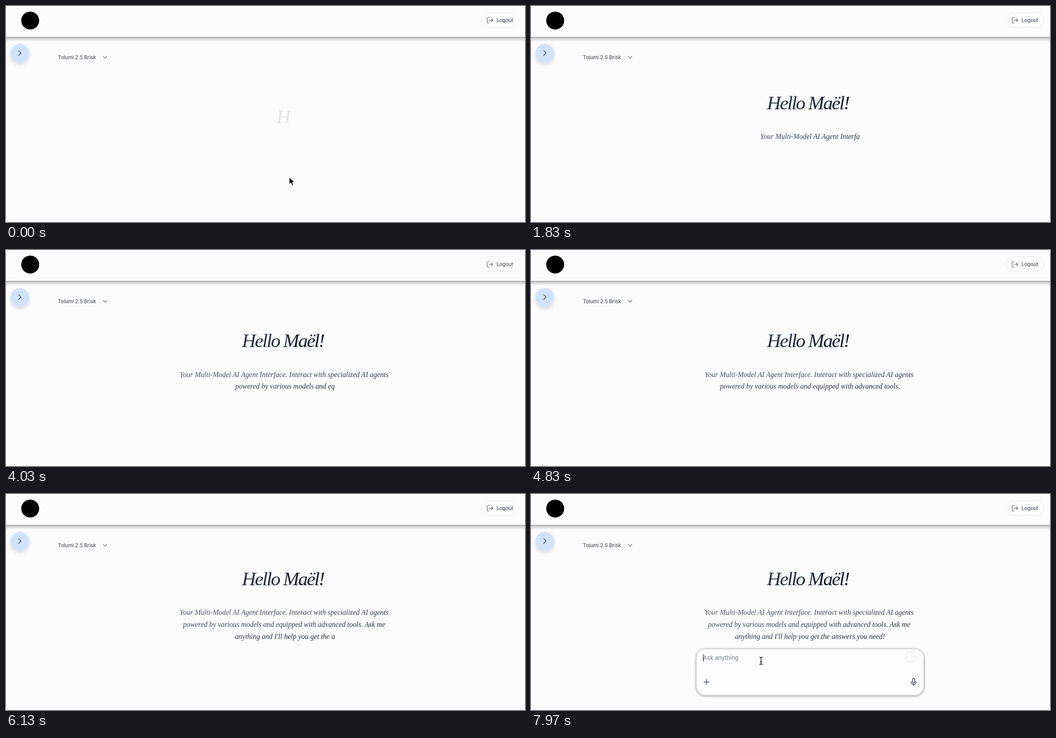
Animation, 1158 px wide and 483 px high, one loop 8000 ms. Source, as an HTML page:

```html
<!DOCTYPE html>
<html lang="en">
<head>
<meta charset="utf-8">
<title>Assistant welcome</title>
<style>
  html, body { margin: 0; width: 100%; height: 100%; overflow: hidden; background: #fcfcfd; }
  svg { display: block; width: 100vw; height: 100vh; }
  text { white-space: pre; }
  .ui { font: 500 11.2px Inter, sans-serif; fill: #53565d; }
  .script { font-family: "Liberation Serif", serif; font-style: italic; text-anchor: middle; }
  .icon { fill: none; stroke: #53565d; stroke-width: 1.2; stroke-linecap: round; stroke-linejoin: round; }
  .dark { stroke: #374151; stroke-width: 1.5; }
</style>
</head>
<body>
<svg viewBox="0 0 1158 483" preserveAspectRatio="none">
  <defs>
    <linearGradient id="headerShade" x2="0" y2="1">
      <stop offset="0" stop-color="#000" stop-opacity=".35"/>
      <stop offset=".3" stop-color="#000" stop-opacity=".18"/>
      <stop offset=".65" stop-color="#000" stop-opacity=".06"/>
      <stop offset="1" stop-color="#000" stop-opacity="0"/>
    </linearGradient>
    <linearGradient id="titleInk" x2="1" y2="1">
      <stop offset="0" stop-color="#374151"/>
      <stop offset="1" stop-color="#060b18"/>
    </linearGradient>
    <linearGradient id="introInk" x2="1" y2="1">
      <stop offset="0" stop-color="#525a6c"/>
      <stop offset="1" stop-color="#111827"/>
    </linearGradient>
    <filter id="softDrop" x="-50%" y="-50%" width="200%" height="200%">
      <feDropShadow dx="0" dy="5" stdDeviation="4" flood-color="#0f172a" flood-opacity=".14"/>
    </filter>
    <filter id="panelShadow" x="-5%" y="-20%" width="110%" height="140%">
      <feDropShadow dx="0" dy="1" stdDeviation="2.6" flood-color="#000" flood-opacity=".48"/>
    </filter>
    <path id="beamShape" d="M-3.5-8q3 0 3.5 1.8Q.5-8 3.5-8M-3.5 8q3 0 3.5-1.8Q.5 8 3.5 8M0-6.5v13M-2 2h4"/>
  </defs>

  <rect width="1158" height="483" fill="#fcfcfd"/>

  <rect y="69" width="1158" height="12" fill="url(#headerShade)"/>
  <circle cx="54" cy="32.5" r="20"/>
  <rect x="1060.5" y="15" width="83.5" height="33" rx="16.5" fill="#fdfdfd" stroke="#e6e7ea"/>
  <path class="icon" d="M1078 26h-3a1.5 1.5 0 0 0-1.5 1.5v9a1.5 1.5 0 0 0 1.5 1.5h3M1077.5 32h8.5m-3-3 3 3-3 3"/>
  <text class="ui" x="1094.5" y="36">Logout</text>

  <circle cx="31" cy="105.5" r="20.8" fill="#d0e3fd" filter="url(#softDrop)"/>
  <path class="icon dark" d="m28.2 99.8 5.4 5.4-5.4 5.4"/>
  <text class="ui" x="115.8" y="118.6">Tolumi 2.5 Brisk</text>
  <path class="icon" d="m217 112.6 4 4 4-4"/>

  <text id="title" class="script" x="618" font-size="43" letter-spacing="-.055em" fill="url(#titleInk)"></text>
  <text id="intro" class="script" font-size="16" fill="url(#introInk)"></text>

  <g id="panel">
    <rect x="369" y="346.5" width="507.5" height="103.5" rx="20" fill="#fdfdfd" stroke="#c6c6ca" filter="url(#panelShadow)"/>
    <text x="384" y="371" font-family="Inter, sans-serif" font-size="12.9" fill="#72767e">Ask anything</text>
    <path class="icon dark" d="M386 420.5h11m-5.5-5.5v11"/>
    <g class="icon dark">
      <rect x="851.3" y="412.5" width="5" height="10" rx="2.5"/>
      <path d="M848.3 419.5v1a5.5 5.5 0 0 0 11 0v-1M853.8 426v3"/>
    </g>
    <g id="focus">
      <path d="M384.5 358.5v16" stroke="#111" stroke-width="1.2"/>
      <circle cx="846.5" cy="364.5" r="11.3" fill="#fdfdfd" stroke="#cfd0d5"/>
    </g>
  </g>

  <path id="arrow" d="M0 0v15.5l3.6-3.4 2.5 5.9 2.8-1.2-2.5-5.7h4.9z" stroke="#fff" stroke-width=".9"/>
  <g id="beam" fill="none">
    <use href="#beamShape" stroke="#fff" stroke-width="3"/>
    <use href="#beamShape" stroke="#111" stroke-width="1.4"/>
  </g>
</svg>
<script>
const LOOP = 8000;
const TITLE = "Hello Maël!";
const INTRO = "Your Multi-Model AI Agent Interface. Interact with specialized AI agents "
  + "powered by various models and equipped with advanced tools. Ask me "
  + "anything and I'll help you get the answers you need!";
const LINE_HEIGHT = 26.7;

// A line starts at `start`, but its first word only wraps once `wrapAt` characters are typed.
const WRAPS = [{ start: 73, wrapAt: 75 }, { start: 140, wrapAt: 145 }];

const el = id => document.getElementById(id);
const [title, intro, panel, focus, arrow, beam] =
  ["title", "intro", "panel", "focus", "arrow", "beam"].map(el);

const clamp = v => Math.max(0, Math.min(1, v));
const progress = (t, from, to) => clamp((t - from) / (to - from));
const easeOut = p => 1 - (1 - p) ** 2;
const mix = (a, b, p) => a + (b - a) * p;
const show = (node, visible) => node.setAttribute("visibility", visible ? "inherit" : "hidden");
const move = (node, x, y) => node.setAttribute("transform", `translate(${x} ${y})`);

// Typing speeds up slightly in the second half.
function introCount(t) {
  const typed = t < 4030 ? 33.3 + (t - 1830) * .03282 : 105.5 + (t - 4030) * .03381;
  return Math.max(0, Math.min(INTRO.length, Math.floor(typed)));
}

function introLines(count) {
  const starts = [0, ...WRAPS.filter(w => count >= w.wrapAt).map(w => w.start)];
  return starts.map((start, i) => INTRO.slice(start, Math.min(count, starts[i + 1] ?? count)));
}

function drawText(t) {
  const count = introCount(t);
  const lines = count ? introLines(count) : [];
  const rise = lines.length * LINE_HEIGHT / 2;
  const shown = easeOut(progress(t, -33, 607));

  title.textContent = TITLE.slice(0, 1 + Math.floor(t / 80));
  title.setAttribute("y", 244 - rise + 20 * (1 - shown));
  title.setAttribute("opacity", shown);

  intro.replaceChildren(...lines.map((line, i) => {
    const span = document.createElementNS("http://www.w3.org/2000/svg", "tspan");
    span.setAttribute("x", 622.5);
    span.setAttribute("y", 310.4 - rise + i * LINE_HEIGHT);
    span.textContent = line;
    return span;
  }));
}

function render(t) {
  drawText(t);

  const entered = easeOut(progress(t, 6620, 7150));
  show(panel, t >= 6620);
  panel.setAttribute("opacity", entered);
  move(panel, 0, 20 * (1 - entered));
  show(focus, t >= 7700);

  const leave = easeOut(progress(t, 200, 780));
  show(arrow, t < 800);
  move(arrow, mix(632, 640, leave), mix(383, 428, leave));

  const arrive = easeOut(progress(t, 7150, 7600));
  show(beam, t >= 7150);
  move(beam, mix(536, 513.3, arrive), mix(398, 373, arrive));
}

const begin = performance.now();
function tick() {
  render((performance.now() - begin) % LOOP);
  requestAnimationFrame(tick);
}
render(0);
requestAnimationFrame(tick);
</script>
</body>
</html>
```
